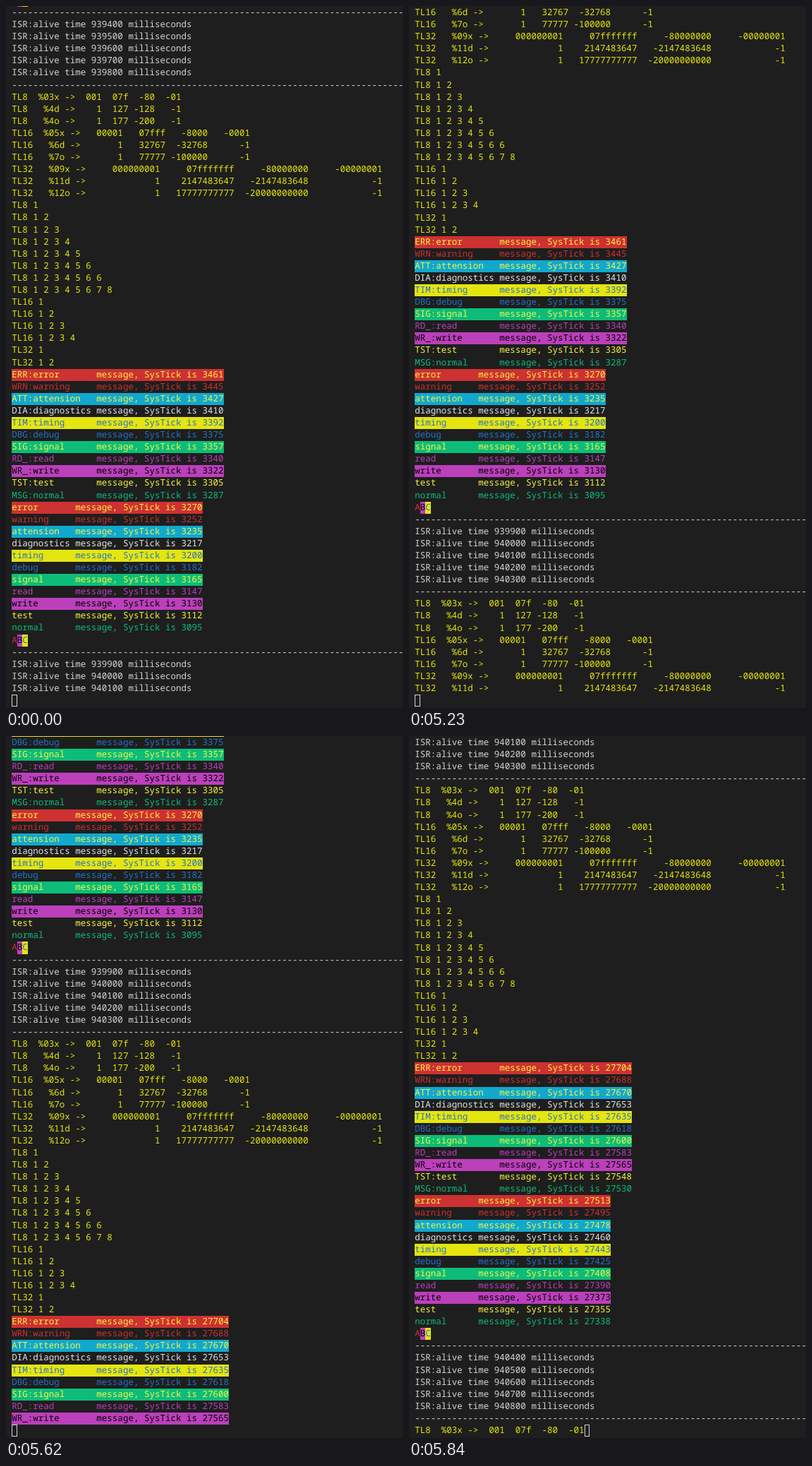
Animation of 563 by 994 pixels, one loop 5.92 s. Source, as an HTML page:

```html
<!DOCTYPE html>
<html lang="en">
<head>
<meta charset="utf-8">
<title>Terminal log</title>
<style>
  html, body { margin: 0; width: 100%; height: 100%; overflow: hidden; background: #1e1e1e; }
  #screen {
    position: relative; width: 563px; height: 994px; overflow: hidden;
    background: #1e1e1e; color: #d4d4d4;
    font: 12.525px "Noto Sans Mono", "DejaVu Sans Mono", monospace;
    text-rendering: geometricPrecision; font-variant-ligatures: none;
  }
  #log { position: absolute; left: 8.2px; top: 1px; }
  .row { position: absolute; left: 0; display: flex; white-space: pre; }
  .row span { height: 17.088px; line-height: 15.1px; }
  #cursor {
    position: absolute; width: 7.5px; height: 17px;
    box-sizing: border-box; border: 1px solid #d4d4d4;
  }
</style>
</head>
<body>
<div id="screen"><div id="log"></div><div id="cursor"></div></div>
<script>
const ROW = 17.088, COL = 7.515, LEFT = 8.2, TOP = 1, ROWS = 58, LOOP = 5920;

const red = '#cd3131', green = '#0dbc79', blue = '#2472c8', cyan = '#11a8cd',
      magenta = '#bc3fbc', yellow = '#e5e510', bright = '#f5f543',
      white = '#e5e5e5', black = '#000', plain = '#d4d4d4';

// tag, name, text colour, background
const levels = [
  ['ERR', 'error', bright, red],
  ['WRN', 'warning', red],
  ['ATT', 'attension', bright, cyan],
  ['DIA', 'diagnostics', white],
  ['TIM', 'timing', blue, yellow],
  ['DBG', 'debug', blue],
  ['SIG', 'signal', bright, green],
  ['RD_', 'read', magenta],
  ['WR_', 'write', black, magenta],
  ['TST', 'test', bright],
  ['MSG', 'normal', green]
];

// name, end column of the format, field width, rows of format and values
const formats = [
  ['TL8', 9, 5, ['%03x 001 07f -80 -01', '%4d 1 127 -128 -1', '%4o 1 177 -200 -1']],
  ['TL16', 10, 8, ['%05x 00001 07fff -8000 -0001', '%6d 1 32767 -32768 -1',
    '%7o 1 77777 -100000 -1']],
  ['TL32', 11, 14, ['%09x 000000001 07fffffff -80000000 -00000001',
    '%11d 1 2147483647 -2147483648 -1', '%12o 1 17777777777 -20000000000 -1']]
];

// A line is a list of [text, colour, background] parts.
const line = (text, color, back) => [[text, color, back]];
const dashes = line('-'.repeat(75), plain);
const abc = [['A', red], ['B', black, magenta], ['C', blue, yellow]];

function formatLines() {
  return formats.flatMap(([name, end, width, rows]) => rows.map(row => {
    const [fmt, ...values] = row.split(' ');
    const head = name + fmt.padStart(end - name.length) + ' ->';
    return line(head + values.map(v => v.padStart(width)).join(''), yellow);
  }));
}

function countLines(name, max) {
  return Array.from({ length: max }, (_, i) => {
    const digits = '1 2 3 4 5 6 7 8'.slice(0, 2 * i + 1);
    return line(name + ' ' + (i === 6 ? digits.replace('7', '6') : digits), yellow);
  });
}

function messageLines(tick) {
  const ticks = i => tick - Math.max(0, Math.floor(17.5 * i - 1));
  const write = (label, i, color, back) =>
    line(label + 'message, SysTick is ' + ticks(i), color, back);
  return [
    ...levels.map(([tag, name, c, b], i) => write((tag + ':' + name).padEnd(16), i, c, b)),
    ...levels.map(([, name, c, b], i) => write(name.padEnd(12), i + levels.length, c, b))
  ];
}

function block(alive, tick) {
  const isr = [0, 1, 2, 3, 4].map(i =>
    line(`ISR:alive time ${alive + 100 * i} milliseconds`, plain));
  return [dashes, ...isr, dashes, ...formatLines(),
    ...countLines('TL8', 8), ...countLines('TL16', 4), ...countLines('TL32', 2),
    ...messageLines(tick), abc];
}

// The first line sits just above the screen.
const lines = [abc, ...block(939400, 3461), ...block(939900, 27704),
  ...block(940400, 0).slice(0, 8)];

const log = document.getElementById('log');
const cursor = document.getElementById('cursor');
const rows = lines.map((parts, i) => {
  const row = document.createElement('div');
  row.className = 'row';
  row.style.top = (i - 1) * ROW + 'px';
  for (const [text, color, back] of parts) {
    const span = document.createElement('span');
    span.textContent = text;
    span.style.color = color;
    if (back) span.style.background = back;
    row.append(span);
  }
  log.append(row);
  return row;
});

// start time, first line on screen, 1 when the cursor waits at the end of a line
const steps = [
  [0, 0, 0], [5000, 5, 1], [5080, 7, 0], [5160, 9, 0], [5230, 11, 0],
  [5310, 14, 0], [5390, 17, 0], [5470, 21, 1], [5540, 28, 0],
  [5620, 35, 0], [5690, 42, 0], [5760, 49, 0], [5840, 56, 1]
];

let shown = null;
function show(step) {
  if (step === shown) return;
  shown = step;
  const [, first, atEnd] = step;
  const count = first + ROWS + atEnd;
  rows.forEach((row, i) => {
    row.style.display = i >= first && i < count ? '' : 'none';
  });
  log.style.top = TOP - first * ROW + 'px';
  const col = atEnd ? lines[count - 1].reduce((n, [text]) => n + text.length, 0) : 0;
  cursor.style.left = LEFT + col * COL + 'px';
  cursor.style.top = TOP + (ROWS - 1) * ROW + 'px';
}

const start = performance.now();
function tick() {
  const t = (performance.now() - start) % LOOP;
  show(steps.findLast(([at]) => at <= t));
  requestAnimationFrame(tick);
}
show(steps[0]);
requestAnimationFrame(tick);
</script>
</body>
</html>
```
